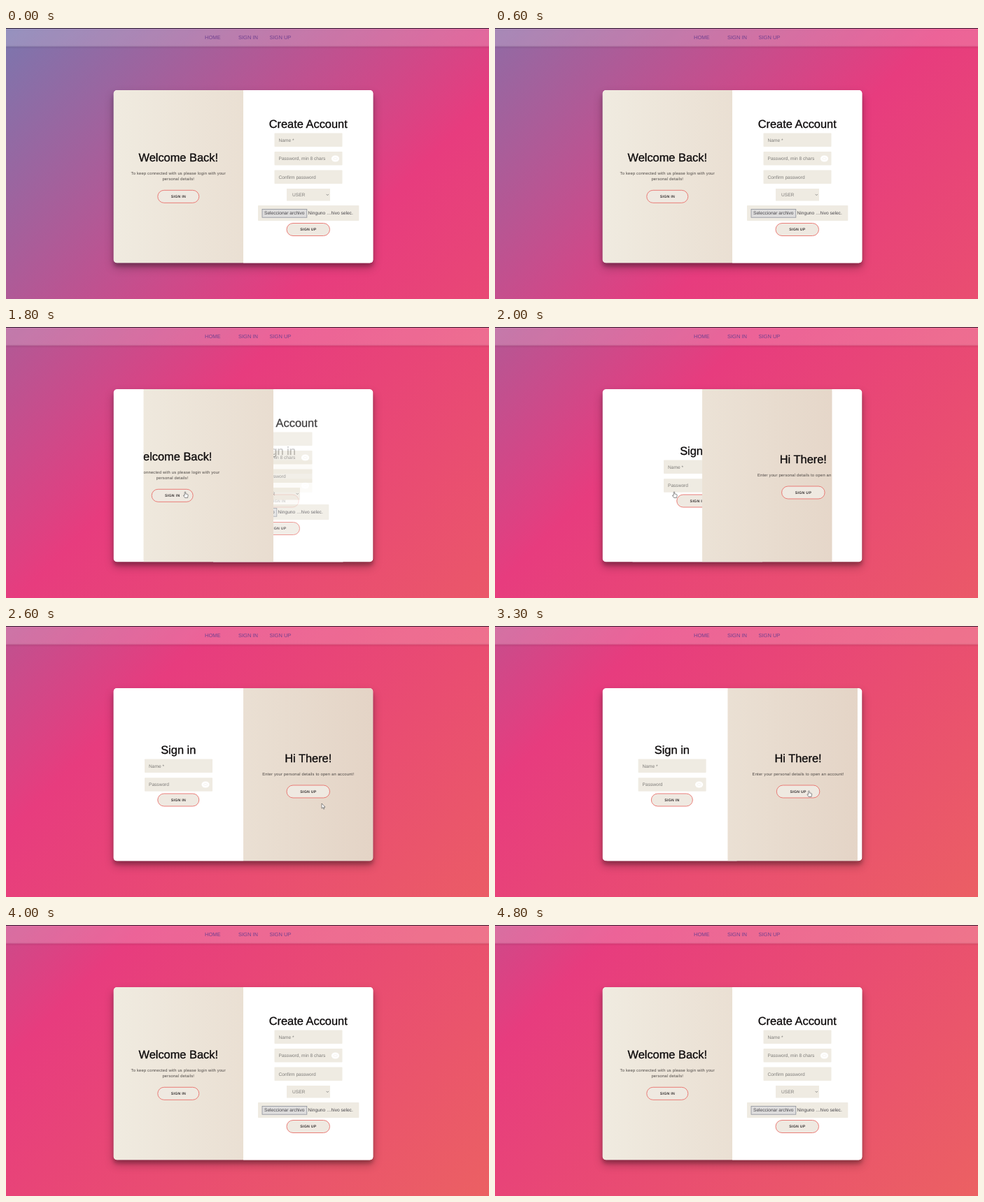
An HTML page for the animation above (4900 ms loop, 690 by 388 pixels).

```html
<!DOCTYPE html>
<html lang="en">
<head>
<meta charset="utf-8">
<title>Sliding sign-in card</title>
<style>
  html, body { margin: 0; width: 100%; height: 100%; overflow: hidden; background: #e73c7e; }
  svg { display: block; width: 690px; height: 388px; }
  text { font-family: "Liberation Sans", Arial, sans-serif; text-rendering: geometricPrecision; }
  .nav { font-size: 7.5px; fill: #71408f; }
  .title { font-size: 16.4px; text-anchor: middle; fill: #0b0809; stroke: #0b0809; stroke-width: .3px; }
  .note { font-size: 5.8px; letter-spacing: .2px; text-anchor: middle; fill: #4b4643; }
  .label { font-size: 5.2px; font-weight: bold; letter-spacing: .3px; text-anchor: middle; fill: #383333; }
  .field { font-size: 6.6px; fill: #7d7b78; }
  .file { font-size: 6.6px; fill: #47454a; }
  .pill { fill: #efe9e1; stroke: #e8716b; stroke-width: .9px; }
  .box { fill: #efebe2; }
  .pointer { fill: #fff; stroke: #444; stroke-width: .6px; stroke-linejoin: round; }
</style>
</head>
<body>
<svg id="stage" viewBox="0 0 690 388"></svg>
<script>
const LOOP = 4900, STEP = 100;
const CARD = { x: 153.5, y: 89, w: 371, h: 247.5 };
const HALF = CARD.w / 2, MID = CARD.x + HALF;
const LEFT_CENTER = CARD.x + HALF / 2, RIGHT_CENTER = MID + HALF / 2;
const SLIDE = 600, TO_SIGN_IN = 1600, TO_SIGN_UP = 3220;

const text = (cls, x, y, s) => `<text class="${cls}" x="${x}" y="${y}">${s}</text>`;
const rect = (x, y, w, h, attrs) => `<rect x="${x}" y="${y}" width="${w}" height="${h}" ${attrs}/>`;
const cardRect = (dy, attrs) => rect(CARD.x, CARD.y + dy, CARD.w, CARD.h, `rx="4.8" ${attrs}`);
const halfPage = x => rect(x, CARD.y, HALF, CARD.h, 'fill="#fff"');
const pill = (cx, y, w, s) =>
  rect(cx - w / 2, y, w, 18, 'rx="9" class="pill"') + text('label', cx + .1, y + 10.9, s);
const input = (x, y, s) => rect(x, y, 97, 19.5, 'rx=".8" class="box"') + text('field', x + 6, y + 12.1, s);
const eye = (x, y) => `<ellipse cx="${x}" cy="${y}" rx="5.6" ry="4.5" fill="#fff"/>
  <path d="M${x - 3} ${y}q3 -3.4 6 0q-3 3.4 -6 0" fill="none" stroke="#f1eee8" stroke-width=".6"/>`;

const signIn = halfPage(CARD.x)
  + text('title', LEFT_CENTER, 183, 'Sign in')
  + input(198, 190.5, 'Name *') + input(198, 217.2, 'Password') + eye(285, 227)
  + pill(LEFT_CENTER, 240, 59, 'SIGN IN');

const signUp = halfPage(MID)
  + text('title', RIGHT_CENTER, 143.2, 'Create Account')
  + input(383.5, 150.5, 'Name *')
  + input(383.5, 177, 'Password, min 8 chars') + eye(470.5, 187)
  + input(383.5, 203.5, 'Confirm password')
  + rect(401, 230, 62, 17.5, 'class="box"') + text('field', 409, 241.2, 'USER')
  + '<path d="M457.6 237.9l1.7 1.7l1.7 -1.7" fill="none" stroke="#777" stroke-width=".8"/>'
  + rect(360, 254, 144.3, 22, 'rx=".8" class="box"')
  + rect(366, 259.4, 63.8, 11.8, 'fill="#dedddd" stroke="#8e919b" stroke-width=".8"')
  + text('file', 369, 267.4, 'Seleccionar archivo')
  + text('file', 431.6, 267.4, 'Ninguno …hivo selec.')
  + pill(RIGHT_CENTER, 279.5, 61.5, 'SIGN UP');

const welcome = text('title', LEFT_CENTER, 191.2, 'Welcome Back!')
  + text('note', LEFT_CENTER, 209.6, 'To keep connected with us please login with your')
  + text('note', LEFT_CENTER, 217.8, 'personal details!')
  + pill(LEFT_CENTER, 232.3, 59, 'SIGN IN');

const hello = text('title', RIGHT_CENTER, 195.2, 'Hi There!')
  + text('note', RIGHT_CENTER, 213.6, 'Enter your personal details to open an account!')
  + pill(RIGHT_CENTER, 228, 61.5, 'SIGN UP');

const stage = document.getElementById('stage');
stage.innerHTML = `
  <defs>
    <linearGradient id="sky" gradientUnits="userSpaceOnUse">
      <stop offset="0" stop-color="#ee7752"/><stop offset=".3333" stop-color="#e73c7e"/>
      <stop offset=".6667" stop-color="#23a6d5"/><stop offset="1" stop-color="#23d5ab"/>
    </linearGradient>
    <linearGradient id="sand" gradientUnits="userSpaceOnUse" x1="${CARD.x}" x2="${CARD.x + CARD.w}" y1="0" y2="0">
      <stop offset="0" stop-color="#f0ebe0"/><stop offset="1" stop-color="#e4d4c6"/>
    </linearGradient>
    <clipPath id="cardClip">${cardRect(0, '')}</clipPath>
    <clipPath id="overlayClip">${rect(CARD.x, CARD.y, HALF, CARD.h, 'id="window"')}</clipPath>
  </defs>
  ${rect(0, 0, 690, 388, 'fill="url(#sky)"')}
  ${rect(0, 26, 690, 2, 'fill="#000" opacity=".1" style="filter:blur(1px)"')}
  ${rect(0, 0, 690, 26.5, 'fill="#fff" opacity=".2"')}
  ${rect(0, 0, 690, 1, 'fill="#1d0f20" opacity=".85"')}
  ${text('nav', 284, 16.3, 'HOME')}${text('nav', 332, 16.3, 'SIGN IN')}${text('nav', 376.5, 16.3, 'SIGN UP')}
  ${cardRect(6.8, 'opacity=".25" style="filter:blur(6.7px)"')}
  ${cardRect(4.8, 'opacity=".22" style="filter:blur(2.4px)"')}
  <g clip-path="url(#cardClip)">
    ${cardRect(0, 'fill="#fff"')}
    <g id="signIn">${signIn}</g>
    <g id="signUp">${signUp}</g>
    <g clip-path="url(#overlayClip)">
      ${cardRect(0, 'fill="url(#sand)"')}
      <g id="welcome">${welcome}</g>
      <g id="hello">${hello}</g>
    </g>
  </g>
  <g id="cursor" class="pointer">
    <path id="arrow" d="M0 0V7.2L1.7 5.7L2.8 8.2L3.9 7.7L2.8 5.3H5Z"/>
    <path id="hand" d="M-.8 .4Q0 -.6 .7 .4V3L3.4 3.5Q4.3 3.8 4.1 5L3.5 8.5H-.4L-2.6 5.2Q-2.4 4.3 -.8 5.2Z"/>
  </g>`;

const el = id => document.getElementById(id);
const shift = (id, x, y = 0) => el(id).setAttribute('transform', `translate(${x} ${y})`);
const show = (id, on) => el(id).setAttribute('visibility', on ? 'visible' : 'hidden');
const clamp = v => Math.min(1, Math.max(0, v));

// cubic-bezier(.42, 0, .58, 1)
function easeInOut(x) {
  if (x <= 0 || x >= 1) return clamp(x);
  let lo = 0, hi = 1, u;
  for (let i = 0; i < 24; i++) {
    u = (lo + hi) / 2;
    const v = 1 - u;
    if (1.26 * u * v * v + 1.74 * u * u * v + u ** 3 < x) lo = u; else hi = u;
  }
  return u * u * (3 - 2 * u);
}

// time, x, y
const PATH = [[1350, 300, 208], [1500, 256, 236], [2050, 256, 236], [2500, 451, 254],
  [2750, 451, 254], [3000, 448.5, 236], [3700, 448.5, 236]];

function drawCursor(t, q) {
  const i = PATH.findIndex(k => k[0] > t);
  const visible = i > 0;
  let hand = false;
  if (visible) {
    const [t0, x0, y0] = PATH[i - 1], [t1, x1, y1] = PATH[i];
    const k = easeInOut((t - t0) / (t1 - t0));
    const x = x0 + (x1 - x0) * k, y = y0 + (y1 - y0) * k;
    shift('cursor', x, y);
    const edge = CARD.x + HALF * q + HALF;
    hand = y > 228 && y < 250 && (x < 276 || (x > 401 && x < 462 && x < edge));
  }
  show('arrow', visible && !hand);
  show('hand', visible && hand);
}

function drawSky(t) {
  const pos = 1.02 - .295 * (1 - t / LOOP) ** 2.2;
  const from = (3730 - 2070 * pos) / 2, to = from - 2156;
  const sky = el('sky');
  for (const axis of 'xy') {
    sky.setAttribute(axis + 1, from);
    sky.setAttribute(axis + 2, to);
  }
}

function draw(t) {
  const returning = t >= TO_SIGN_UP;
  const q = returning
    ? 1 - easeInOut((t - TO_SIGN_UP) / SLIDE)
    : easeInOut((t - TO_SIGN_IN) / SLIDE);
  drawSky(t);
  el('window').setAttribute('x', CARD.x + HALF * q);
  shift('signIn', HALF * (1 - q));
  shift('signUp', -HALF * q);
  shift('welcome', -.2 * HALF * q);
  shift('hello', .2 * HALF * (1 - q));
  const opacity = returning ? +(q <= .5) : (q < .625 ? 1 - q : 0);
  el('signUp').setAttribute('opacity', opacity);
  drawCursor(t, q);
}

const start = performance.now();
function frame() {
  const t = (performance.now() - start) % LOOP;
  draw(Math.floor(t / STEP) * STEP);
  requestAnimationFrame(frame);
}
frame();
</script>
</body>
</html>
```
